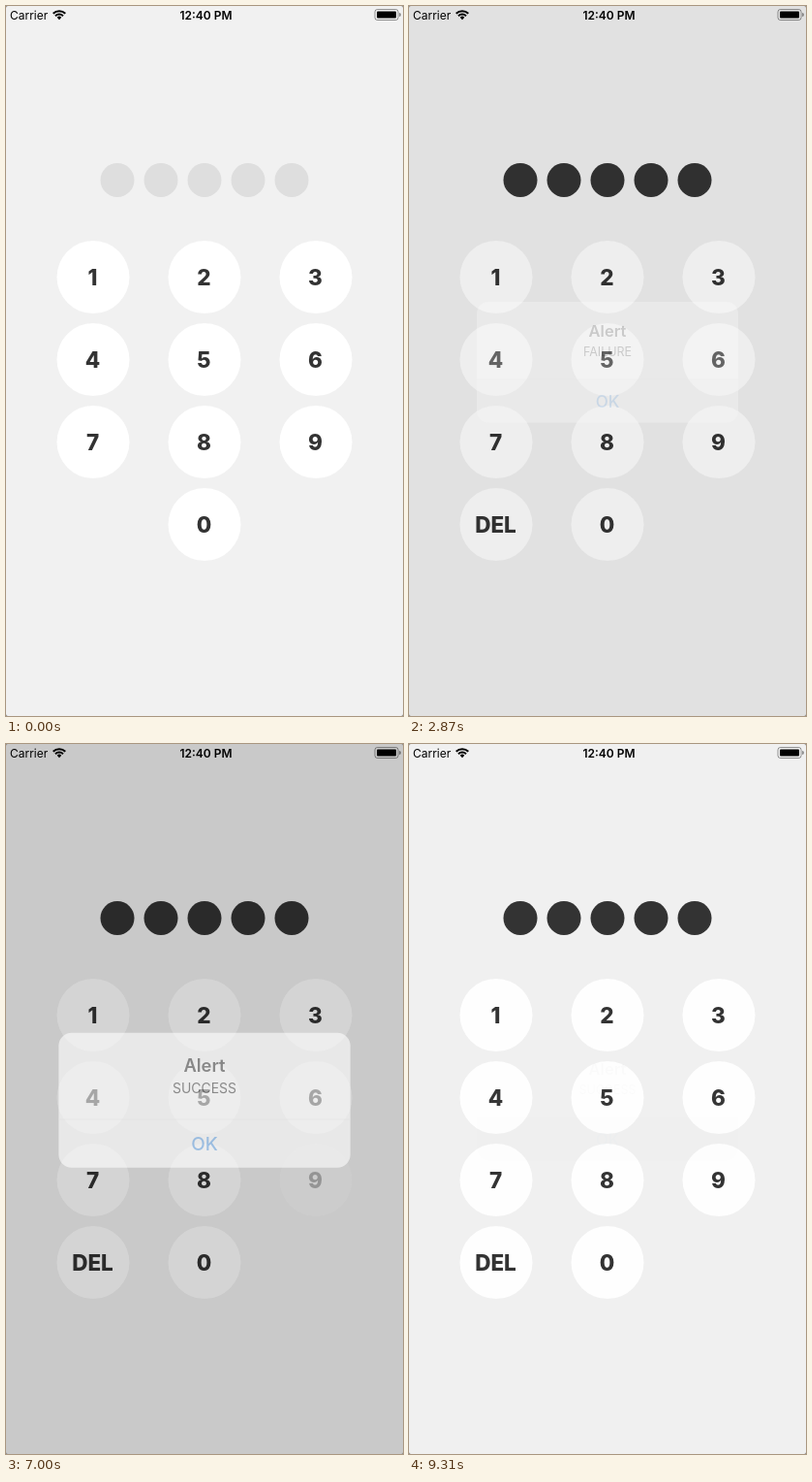
An HTML page that plays this animation: 410x732 px, repeating every 9450 ms.

```html
<!DOCTYPE html>
<html lang="en">
<head>
<meta charset="utf-8">
<title>Passcode keypad</title>
<style>
  html, body { margin: 0; width: 100%; height: 100%; overflow: hidden; background: #777; }
  svg { display: block; width: 100vw; height: 100vh; font-family: Inter, Roboto, "Liberation Sans", sans-serif; }
  text { user-select: none; }
  .label { font-size: 22.5px; font-weight: 800; fill: #333; text-anchor: middle; }
  .status { font-size: 12px; }
  #card text { text-anchor: middle; }
</style>
</head>
<body>
<svg id="stage" viewBox="0 0 410 732">
  <rect width="410" height="732" rx="2" fill="#f1f1f1"/>
  <g id="dots"></g>
  <g id="keys"></g>
  <rect id="dim" width="410" height="732" rx="2" opacity="0"/>
  <g class="status">
    <text x="4" y="14">Carrier</text>
    <text x="206.5" y="14" font-weight="600" text-anchor="middle">12:40 PM</text>
    <g fill="none" stroke="#000" stroke-width="2">
      <path d="M48.7 7.7a9 9 0 0 1 12.6 0"/>
      <path d="M51 10.2a5.7 5.7 0 0 1 8 0"/>
    </g>
    <path d="M55 14.2l-2.3-2.4a3.2 3.2 0 0 1 4.6 0z"/>
    <rect x="381" y="3.5" width="24" height="11" rx="2.5" fill="none" stroke="#000" stroke-opacity=".4"/>
    <rect x="383" y="5.5" width="20" height="7" rx="1"/>
    <path d="M406 7a2 2 0 0 1 0 4z" fill-opacity=".4"/>
  </g>
  <g id="card" visibility="hidden">
    <clipPath id="round"><rect x="70" y="305" width="270" height="124.500" rx="12"/></clipPath>
    <rect id="panel" x="70" y="305" width="270" height="124.500" rx="12" fill="#fff"/>
    <g id="content">
      <rect id="touch" x="70" y="385" width="270" height="45" fill="#ececec" clip-path="url(#round)"/>
      <path d="M70 385h270" stroke="#dfdfdf"/>
      <text x="205" y="341" font-size="16.500" font-weight="600">Alert</text>
      <text id="message" x="205" y="361" font-size="12.500"></text>
      <text x="205" y="414" font-size="17" font-weight="500" fill="#2f7fd3">OK</text>
    </g>
  </g>
</svg>
<script>
const LOOP = 9450, STEP = 70, FADE = 250, ALERT = 420;

// Touches per key: [down, up]
const touches = {
  5: [[560, 560], [910, 980], [1120, 1120], [1540, 1680], [5740, 5880]],
  DEL: [[3150, 3500], [3640, 3710], [3850, 4060]],
  1: [[4690, 4830]],
  3: [[5250, 5320]],
  7: [[6230, 6370]],
  9: [[6720, 6930]]
};

// Each time one digit is entered or deleted
const entered = [560, 630, 980, 1120, 1680, 4830, 5320, 5880, 6370, 6930];
const deleted = [3360, 3500, 3710, 3920, 4060];

const alerts = [
  { open: 1680, press: 2380, close: 2680, message: 'FAILURE' },
  { open: 6930, press: 8750, close: 8980, message: 'SUCCESS' }
];

const byId = id => document.getElementById(id);
const clamp = v => Math.min(1, Math.max(0, v));
const easeOut = u => 1 - (1 - clamp(u)) ** 3;
const easeInOut = u => u < .5 ? 2 * u * u : 1 - 2 * (1 - u) ** 2;

function add(parent, tag, attrs, text = '') {
  const node = document.createElementNS('http://www.w3.org/2000/svg', tag);
  for (const name in attrs) node.setAttribute(name, attrs[name]);
  node.textContent = text;
  return parent.appendChild(node);
}

const set = (id, name, value) => byId(id).setAttribute(name, value);

const dots = [0, 1, 2, 3, 4].map(i =>
  add(byId('dots'), 'circle', { cx: 115 + 45 * i, cy: 179.5, r: 17.5 }));

const keys = {};
['1', '2', '3', '4', '5', '6', '7', '8', '9', 'DEL', '0'].forEach((name, i) => {
  const x = 90 + 115 * (i % 3), y = 279.5 + 85 * Math.floor(i / 3);
  const key = keys[name] = add(byId('keys'), 'g', {});
  add(key, 'circle', { cx: x, cy: y, r: 37.5, fill: '#fff' });
  add(key, 'text', { x: x - .5, y: y + 8, class: 'label' }, name);
});

function keyOpacity(name, t) {
  const last = (touches[name] || []).filter(([down]) => down <= t).pop();
  if (!last) return 1;
  return .2 + .8 * easeInOut(clamp((t - last[1]) / FADE));
}

function drawAlert(t) {
  const alert = alerts.find(a => t >= a.open && t < a.close + ALERT);
  set('card', 'visibility', alert ? 'visible' : 'hidden');
  if (!alert) return set('dim', 'opacity', 0);

  const shown = easeOut((t - alert.open) / ALERT);
  const level = shown * (1 - easeOut((t - alert.close) / ALERT));
  const scale = 1.2 - .2 * shown;
  set('dim', 'opacity', .4 * level);
  set('card', 'transform', `translate(205 367) scale(${scale}) translate(-205 -367)`);
  set('panel', 'opacity', 1 - (1 - level) ** 1.6);
  set('content', 'opacity', level);
  set('touch', 'opacity', clamp((t - alert.press) / STEP));
  byId('message').textContent = alert.message;
}

function draw(t) {
  const past = times => times.filter(time => time <= t).length;
  const count = past(entered) - past(deleted);
  dots.forEach((dot, i) => dot.setAttribute('fill', i < count ? '#333' : '#dedede'));
  for (const name in keys) keys[name].setAttribute('opacity', keyOpacity(name, t));
  keys.DEL.setAttribute('visibility', count ? 'visible' : 'hidden');
  drawAlert(t);
}

const start = performance.now();
function tick() {
  const t = (performance.now() - start) % LOOP;
  draw(Math.floor(t / STEP) * STEP);
  requestAnimationFrame(tick);
}
tick();
</script>
</body>
</html>
```
